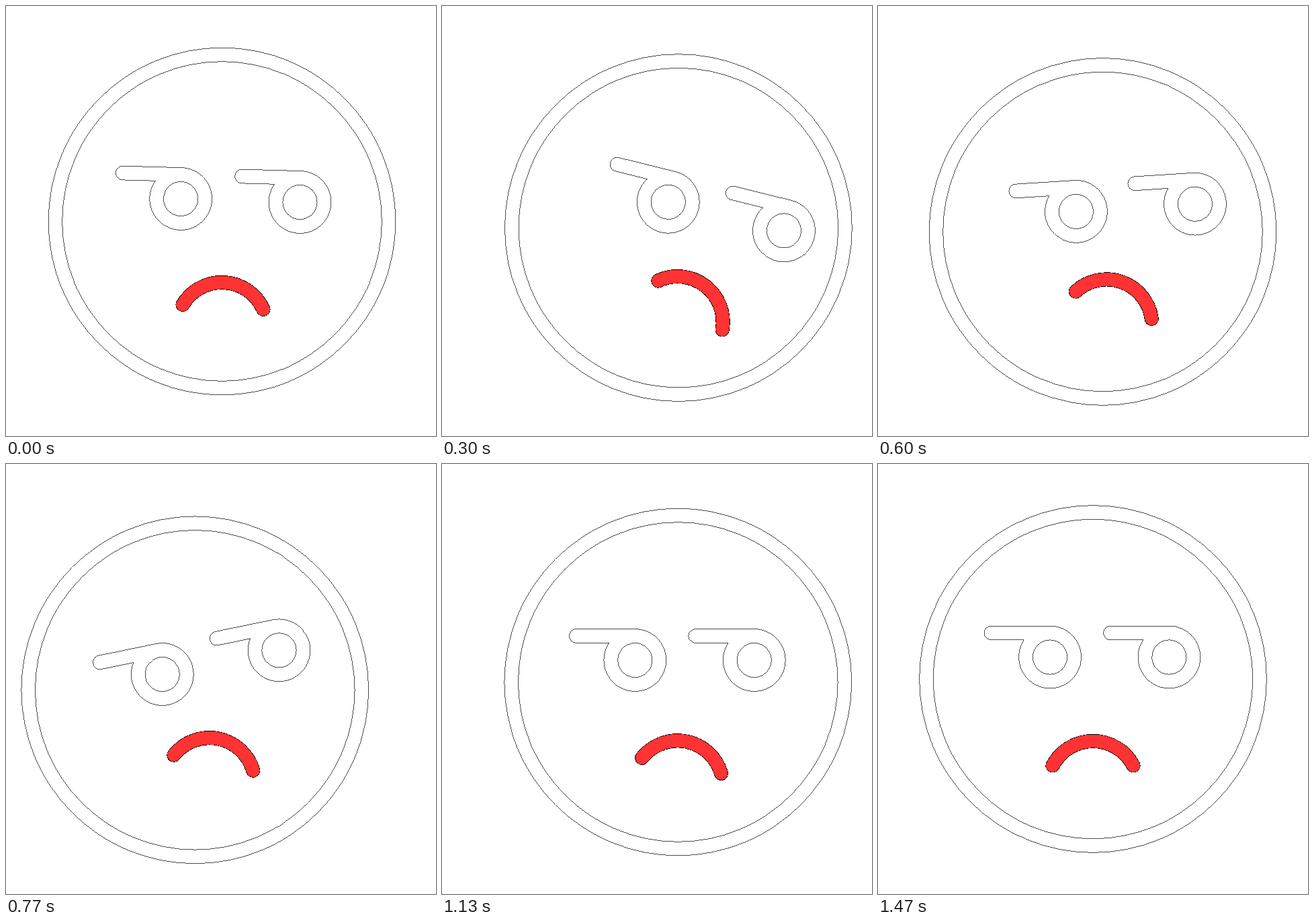
These frames come from a looping animation (640x640 px, 1670 ms). An HTML page:

```html
<!DOCTYPE html>
<html lang="en">
<head>
<meta charset="utf-8">
<title>Grumpy face</title>
<style>
  html, body { margin: 0; width: 100%; height: 100%; overflow: hidden; background: #fff; }
  svg { display: block; width: 100vw; height: 100vh; }
  .line { fill: none; stroke: #000; stroke-width: 0.7; }
  .mouth { fill: none; stroke-linecap: round; }
</style>
</head>
<body>
<svg viewBox="0 0 640 640" shape-rendering="crispEdges">
  <defs>
    <g id="eye" class="line">
      <path d="M0-46.4H-88.5a10.4 10.4 0 0 0 0 20.7H-38.6A46.4 46.4 0 1 0 0-46.4"/>
      <circle r="25.6"/>
    </g>
    <path id="arc" d="M-60 128.9A67.6 67.6 0 0 1 60 128.9"/>
  </defs>
  <g id="face">
    <circle class="line" r="258.4"/>
    <circle class="line" r="237.8"/>
    <g id="eyes">
      <use href="#eye" x="-64" y="-32.5"/>
      <use href="#eye" x="113.4" y="-32.5"/>
    </g>
    <g id="mouth" class="mouth">
      <use href="#arc" stroke="#000" stroke-width="21.2"/>
      <use href="#arc" stroke="#f33" stroke-width="19.8"/>
    </g>
  </g>
</svg>
<script>
const LOOP = 1670, LAST_STEP = 44;

const linear = u => u;
const smooth = u => u * u * (3 - 2 * u);

// Key points: step, x, y, angle, easing towards this key
const key = (step, x, y, angle = 0, ease = linear) => ({ step, x, y, angle, ease });

const parts = {
  face: {
    pivot: '0 0',
    keys: [
      key(0, 321.5, 320.5), key(12, 362, 333.3), key(15.5, 362, 335.6),
      key(22, 278.7, 336.6, 0, smooth), key(31.4, 360, 328, 0, smooth),
      key(34, 351.3, 324.5), key(44, 320, 320)
    ]
  },
  eyes: {
    pivot: '-28 62.5',
    keys: [
      key(0, 0, 0, 1.6), key(6.6, 23.5, 0, 18.6), key(22.5, 33, 0, -12.4),
      key(30.3, 46, 0, 0), key(34, 0, 0)
    ]
  },
  mouth: {
    pivot: '26 154',
    keys: [
      key(0, 0, 0, 3.3), key(6.6, 0, 0, 41.7), key(13.5, -8.5, -8.5, 29.2),
      key(22.5, 21, -16.2, 10.2), key(30.3, 41, -14.6, 23),
      key(34, 0, 0, 11.1), key(44, 0, 0)
    ]
  }
};

function poseAt(keys, step) {
  const next = keys.findIndex(k => k.step > step);
  if (next < 0) return keys[keys.length - 1];
  const a = keys[next - 1], b = keys[next];
  const u = b.ease((step - a.step) / (b.step - a.step));
  const mix = name => a[name] + (b[name] - a[name]) * u;
  return { x: mix('x'), y: mix('y'), angle: mix('angle') };
}

function draw(ms) {
  // 30 steps per second, then a rest on the last one
  const step = Math.min(LAST_STEP, Math.floor((ms % LOOP + 4) * 0.03));
  for (const [id, { pivot, keys }] of Object.entries(parts)) {
    const { x, y, angle } = poseAt(keys, step);
    document.getElementById(id)
      .setAttribute('transform', `translate(${x} ${y}) rotate(${angle} ${pivot})`);
  }
}

const start = performance.now();
function tick() {
  draw(performance.now() - start);
  requestAnimationFrame(tick);
}
tick();
</script>
</body>
</html>
```
